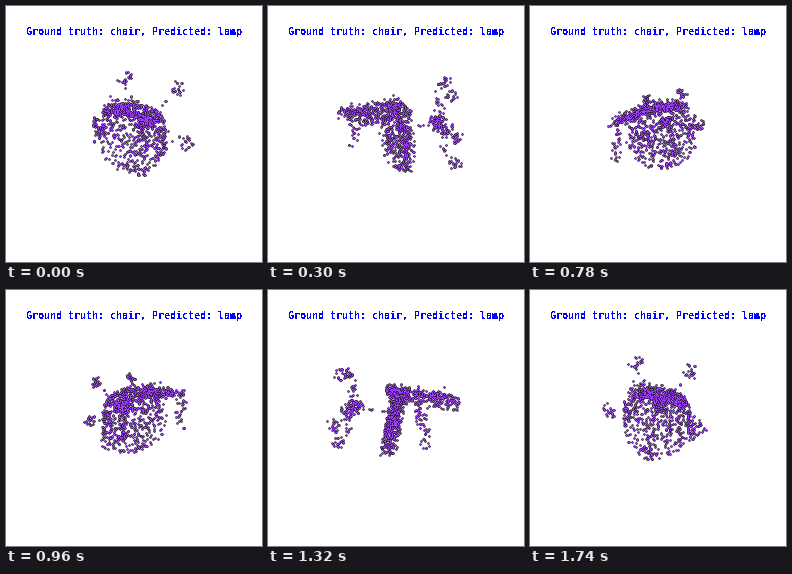
Write a matplotlib script that moves like this. It is 256x256 px and loops after 1800 ms.

```python
import numpy as np
import matplotlib.pyplot as plt
from matplotlib.animation import FuncAnimation

SIZE, DPI = 256, 100
FRAMES, STEP = 30, 60
CX, CY, CAMERA = 128, 116, 247
START = 10  # degrees of turn at the loop's beginning
PX = 72 / DPI

rng = np.random.default_rng(7)


def ball(n, w, y, s, r):
    """Points scattered inside a small ball."""
    v = rng.normal(size=(n, 3))
    v *= (r * rng.random(n) ** (1 / 3) / np.linalg.norm(v, axis=1))[:, None]
    return v + (w, y, s)


def rod(n, a, b, r):
    """Points scattered along a thick line."""
    t = rng.random((n, 1))
    return np.array(a) + t * np.subtract(b, a) + rng.uniform(-r, r, (n, 3))


def seat(n):
    radius = 35 * np.sqrt(rng.random(n)) + rng.uniform(-2, 2, n)
    a = rng.uniform(0, 2 * np.pi, n)
    w, y = radius * np.cos(a), 14 + radius * np.sin(a)
    return np.column_stack([w, y, 3 + 0.2 * (y - 14) + rng.uniform(-7, 7, n)])


def back(n):
    w = rng.uniform(-30, 30, n)
    s = 10 - (71 - 0.008 * w**2) * rng.random(n) ** 1.1
    y = -16 - 0.12 * s + 0.2 * w + 0.008 * w**2 + rng.normal(0, 2.6, n)
    return np.column_stack([w, y, s])


def star():
    hub = (0, 1, 41)
    parts = [ball(45, *hub, 9), rod(10, hub, (0, 5, 8), 2)]
    for a in np.radians(28 + 72 * np.arange(5)):
        w, y = 38 * np.cos(a), 38 * np.sin(a)
        tip = (w, y - 1, 54 + 0.12 * y)
        knee = (0.8 * w, 0.8 * y, 47 + 0.12 * y)
        parts += [rod(13, hub, knee, 3), ball(20, *tip, 6.5)]
    return np.vstack(parts)


cloud = np.vstack([
    seat(410),
    back(360),
    star(),
    rod(30, (35, 4, -22), (35, 37, -22), 4),
    rod(28, (-36, -8, -28), (-36, 21, -28), 4),
])


def project(k):
    turn = np.radians(START + 360 * k / FRAMES)
    w, y, s = cloud.T
    x = w * np.cos(turn) + s * np.sin(turn)
    z = s * np.cos(turn) - w * np.sin(turn)
    scale = CAMERA / (CAMERA - z)
    return CX + x * scale, CY + y * scale


fig = plt.figure(figsize=(SIZE / DPI, SIZE / DPI), dpi=DPI, facecolor="white")
ax = fig.add_axes([0, 0, 1, 1])
ax.set(xlim=(0, SIZE), ylim=(SIZE, 0))
ax.axis("off")

title = ax.text(19.5, 29, "Ground truth: chair, Predicted: lamp",
                family="DejaVu Sans Mono", weight="bold", size=10 * PX,
                color="#0000ff", va="baseline")
title.set_antialiased(False)


def dots(width, color):
    return ax.plot([], [], "o", ms=width * PX, mew=0, color=color,
                   antialiased=False)[0]


layers = [dots(2.5, "#1c0a2c"), dots(1.3, "#a03cff")]


def draw(k):
    x, y = project(k)
    for layer in layers:
        layer.set_data(x, y)
    return layers


anim = FuncAnimation(fig, draw, frames=FRAMES, interval=STEP,
                     repeat=True, repeat_delay=0)
plt.show()
```
